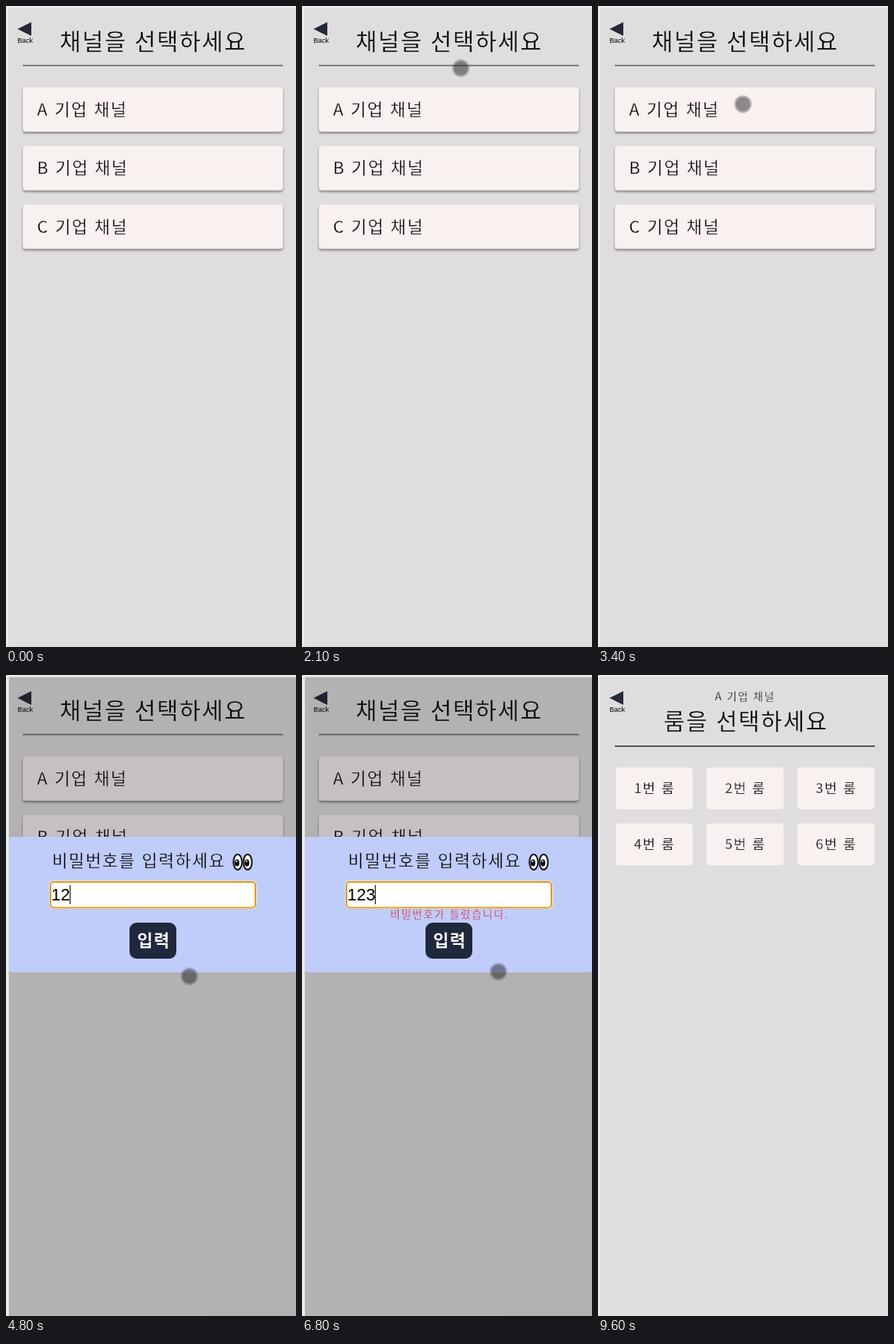
An HTML page that plays this animation: 378x836 px, repeating every 9.9 s.

```html
<!DOCTYPE html>
<html lang="ko">
<head>
<meta charset="utf-8">
<style>
html, body { margin: 0; width: 100%; height: 100%; overflow: hidden; background: #dfdddd; }
svg { display: block; }
/* a hairline in the colour behind the text gives it a lighter weight */
text {
  font-family: "Noto Sans CJK KR", "Noto Sans CJK", sans-serif; font-weight: 350;
  letter-spacing: 1.6px; white-space: pre; fill: #000;
  stroke: var(--behind, #dfdddd); stroke-width: .35px;
}
.latin { font-family: "Liberation Sans", Arial, sans-serif; letter-spacing: 0; stroke: none; }
.cards { --behind: #f9f0f0; }
.card { fill: #f9f0f0; }
.raised { filter: drop-shadow(0 2.5px 1.8px rgba(0, 0, 0, .42)); }
#modal { --behind: #c0ccfa; }
#error { fill: #d8142c; }
.button { fill: #fff; font-weight: 700; stroke: none; }
</style>
</head>
<body>
<svg id="stage" width="378" height="836" viewBox="0 0 378 836"></svg>
<script>
const LOOP = 9900, STEP = 100, MOVE = 500;

const label = (x, y, size, str, more = '') =>
  `<text x="${x}" y="${y}" font-size="${size}" ${more}>${str}</text>`;
const box = (x, y, w, h, r, more) =>
  `<rect x="${x}" y="${y}" width="${w}" height="${h}" rx="${r}" ${more}/>`;
const rule = (y, color) => box(22, y, 339, 1.6, 0, `fill="${color}"`);

const channels = ['A', 'B', 'C'].map((name, i) => {
  const y = 106 + i * 76.4;
  return box(22, y, 339, 58, 4, 'class="card raised"') +
    label(40.5, y + 37, 22, name + ' 기업 채널') +
    box(22, y, 339, 58, 4, `id="tap${name}" fill="#33b5e5" fill-opacity=".4"`);
}).join('');

const rooms = Array.from({ length: 6 }, (_, i) => {
  const x = 23 + i % 3 * 118.4, y = 120.5 + Math.floor(i / 3) * 73;
  return box(x, y, 100.5, 54.5, 4, 'class="card"') +
    label(x + 24, y + 33.5, 17.6, i + 1 + '번 룸');
}).join('');

const eye = x => `<ellipse cx="${x}" cy="244" rx="5.6" ry="10" fill="#fff" stroke="#111" stroke-width="2"/>
  <ellipse cx="${x - 1}" cy="245" rx="3.2" ry="4.6" fill="#111"/>
  <circle cx="${x - 1.5}" cy="243" r="1.1" fill="#fff"/>`;

stage.innerHTML = `
  <rect width="378" height="836" fill="#ebeeee"/>
  <rect x="3" y="2" width="375" height="834" fill="#dfdddd"/>
  <path d="M15 30L33 21V39Z" fill="#262a3a"/>
  ${label(15, 48, 9, 'Back', 'class="latin"')}
  <g id="channelPage">
    ${label(70, 57, 30, '채널을 선택하세요')}${rule(76.8, '#666')}
    <g class="cards">${channels}</g>
  </g>
  <g id="roomPage">
    ${label(152.5, 33, 13.9, 'A 기업 채널')}
    ${label(85.5, 71, 30, '룸을 선택하세요')}${rule(92, '#333')}
    <g class="cards">${rooms}</g>
  </g>
  <g id="modal">
    <rect x="4" y="3" width="374" height="833" fill-opacity=".2"/>
    ${box(4, 211, 374, 177, 4, 'fill="#c0ccfa"')}
    ${label(60, 249.5, 22, '비밀번호를 입력하세요')}${eye(302)}${eye(315)}
    ${box(58, 270, 267, 34, 4, 'fill="#fff"')}
    <g id="focus">
      ${box(56.5, 268.5, 270, 36.5, 5, 'fill="#fff"')}
      ${box(58, 270, 267, 33.5, 4, 'fill="#fff" stroke="#e59a12" stroke-width="2"')}
    </g>
    ${label(59, 294, 22, '', 'id="entry" class="latin"')}
    <rect id="caret" y="274" width="1" height="25"/>
    ${label(115, 317, 13.9, '비밀번호가 틀렸습니다.', 'id="error"')}
    ${box(161, 323, 61, 47, 9, 'fill="#20283c"')}
    ${label(171, 354, 22, '입력', 'class="button"')}
  </g>
  <g id="touch">
    <circle r="9.5" fill="#191919" fill-opacity=".48"/>
    <circle r="10.5" fill="none" stroke="#555" stroke-opacity=".35" stroke-width="2"/>
  </g>`;

// Each stop: arrival time, x, y
const button = [192, 347];
const stops = [
  [100, 298, 508], [800, 207, 128], [2100, 207, 81], [2600, 200, 212],
  [3400, 189, 128], [4200, 190, 287], [4800, 239, 393], [5600, ...button],
  [6800, 256, 387], [7500, ...button], [8600, 320, 473]
];

// Rest at a stop, then ease to the next so as to arrive on time
function position(t) {
  const i = stops.findIndex(s => s[0] > t);
  const [, x0, y0] = stops[i - 1], [end, x1, y1] = stops[i];
  const k = Math.max(0, 1 - (end - t) / MOVE), e = k * k * (3 - 2 * k);
  return [x0 + (x1 - x0) * e, y0 + (y1 - y0) * e];
}

const within = (t, ...spans) => spans.some(([a, b]) => t >= a && t < b);
const show = (id, on) => document.getElementById(id).setAttribute('display', on ? 'inline' : 'none');

function draw(now) {
  const t = Math.floor(now % LOOP / STEP) * STEP;
  const inRoom = t >= 7600, focused = t >= 4200;
  show('channelPage', !inRoom);
  show('roomPage', inRoom);
  show('tapA', within(t, [1000, 1100], [3700, 3800]));
  show('tapB', within(t, [2600, 2700]));
  show('tapC', false);
  show('modal', within(t, [1000, 2100], [2600, 3200], [3700, 7600]));

  const typed = [4600, 4800, 5000, 7100].filter(k => t >= k).length;
  entry.textContent = '1234'.slice(0, typed);
  caret.setAttribute('x', 59 + typed * 12);
  show('focus', focused);
  show('caret', focused && Math.floor((t + 300) / 500) % 2 === 0);
  show('error', t >= 5700);

  const visible = within(t, [100, 8600]);
  show('touch', visible);
  if (visible) touch.setAttribute('transform', `translate(${position(t)})`);
}

const start = performance.now();
function frame() {
  draw(performance.now() - start);
  requestAnimationFrame(frame);
}
frame();
</script>
</body>
</html>
```
